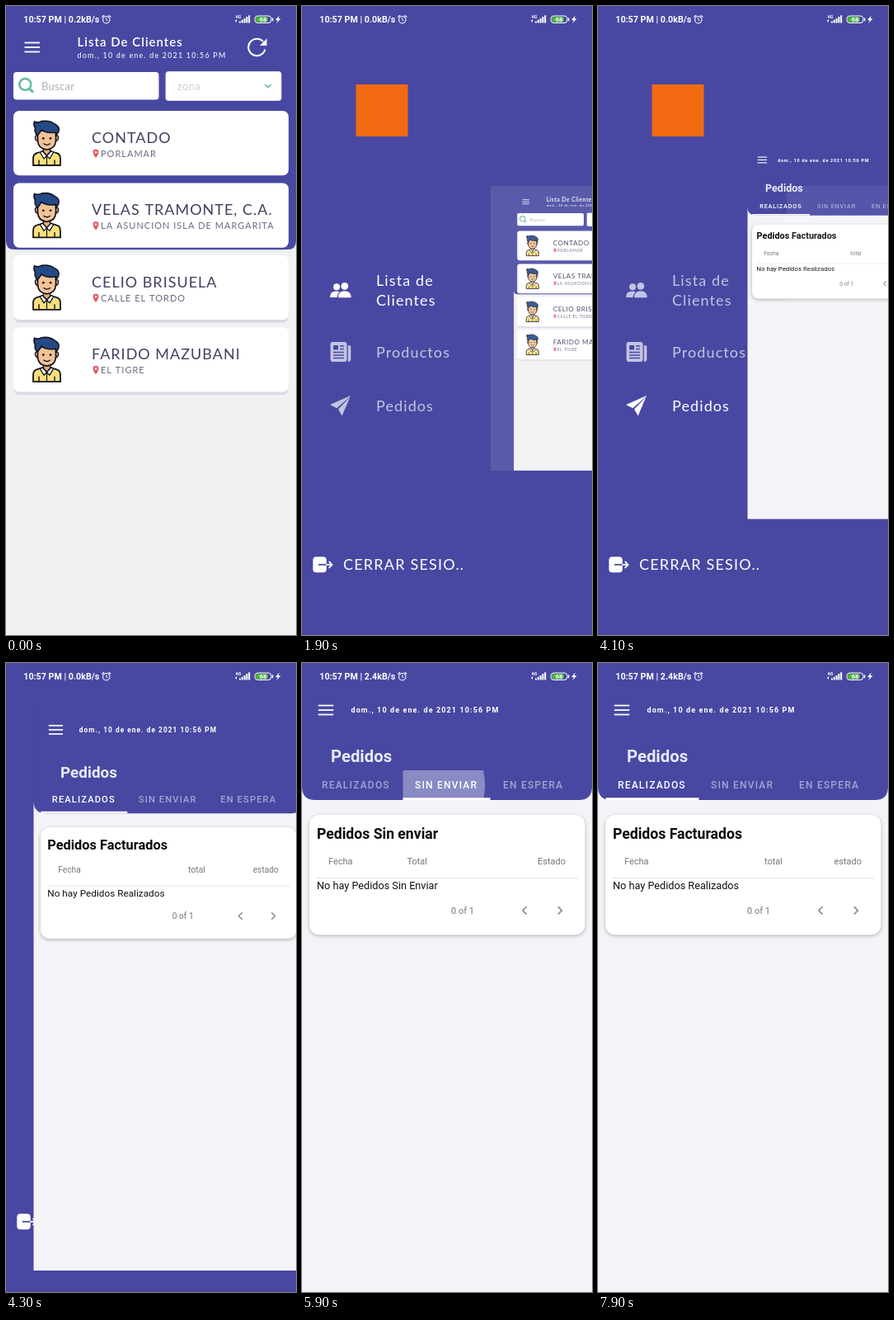
Animation of 352 by 762 pixels, one loop 8 s. Source, as an HTML page with a canvas:

```html
<!DOCTYPE html>
<html lang="es">
<head>
<meta charset="utf-8">
<title>Clientes y pedidos</title>
<style>
html, body { margin: 0; width: 100%; height: 100%; overflow: hidden; background: #4848a2; }
canvas { display: block; width: 352px; height: 762px; }
</style>
</head>
<body>
<canvas id="stage"></canvas>
<script>
const W = 352, H = 762, LOOP = 8000;
const PURPLE = '#4848a2', INK = '#433f62', GREEN = '#63b8a2';
const LATO = 'Lato, "Open Sans", sans-serif';
const ROBOTO = 'Roboto, Arial, sans-serif';
const DATE = 'dom., 10 de ene. de 2021 10:56 PM';

const canvas = document.getElementById('stage');
const ctx = canvas.getContext('2d');
const dpr = window.devicePixelRatio || 1;
canvas.width = W * dpr;
canvas.height = H * dpr;

const clamp = v => Math.max(0, Math.min(1, v));
const phase = (t, from, to) => clamp((t - from) / (to - from));
const smooth = v => v * v * (3 - 2 * v);
const white = a => `rgba(255,255,255,${a})`;

// Critically damped spring, 0 to 1
function spring(ms) {
  if (ms <= 0) return 0;
  const x = ms * 0.01207;
  return 1 - (1 + x) * Math.exp(-x);
}

function text(str, x, y, font, color, spacing = 0, align = 'left') {
  ctx.font = font;
  ctx.letterSpacing = spacing + 'px';
  ctx.textAlign = align;
  ctx.fillStyle = color;
  ctx.fillText(str, x, y);
}

function box(x, y, w, h, r, color) {
  ctx.beginPath();
  ctx.roundRect(x, y, w, h, r);
  ctx.fillStyle = color;
  ctx.fill();
}

function dot(x, y, r, color) {
  ctx.beginPath();
  ctx.arc(x, y, r, 0, 7);
  ctx.fillStyle = color;
  ctx.fill();
}

function line(points, color, width) {
  ctx.beginPath();
  points.forEach(([x, y]) => ctx.lineTo(x, y));
  ctx.strokeStyle = color;
  ctx.lineWidth = width;
  ctx.stroke();
}

function poly(points, color) {
  ctx.beginPath();
  points.forEach(([x, y]) => ctx.lineTo(x, y));
  ctx.fillStyle = color;
  ctx.fill();
}

function path(d, fill, stroke, width) {
  const p = new Path2D(d);
  if (fill) { ctx.fillStyle = fill; ctx.fill(p); }
  if (stroke) { ctx.strokeStyle = stroke; ctx.lineWidth = width; ctx.stroke(p); }
}

function at(x, y, draw) {
  ctx.save();
  ctx.translate(x, y);
  draw();
  ctx.restore();
}

function burger(x, y) {
  for (const dy of [-5.5, 0, 5.5]) line([[x, y + dy], [x + 18.5, y + dy]], '#fff', 1.8);
}

function statusBar(t) {
  const speed = t < 1800 ? '0.2' : t < 5800 ? '0.0' : '2.4';
  text(`10:57 PM | ${speed}kB/s`, 21.3, 20.2, `700 10.7px ${ROBOTO}`, '#fff');

  // alarm clock
  ctx.beginPath();
  ctx.arc(121.8, 16.7, 4.2, 0, 7);
  ctx.strokeStyle = '#fff';
  ctx.lineWidth = 1.1;
  ctx.stroke();
  line([[121.8, 14.2], [121.8, 17], [123.6, 18]], '#fff', 1);
  line([[116.4, 13.4], [119, 11.2]], '#fff', 1.3);
  line([[127.2, 13.4], [124.6, 11.2]], '#fff', 1.3);

  // signal
  text('4G', 278.5, 15, `700 5.5px ${ROBOTO}`, '#fff');
  poly([[278, 18], [280, 16], [280, 20]], '#fff');
  for (let i = 0; i < 5; i++) box(283 + i * 2.8, 18.5 - i * 1.8, 2, 2 + i * 1.8, 0.5, '#fff');

  // battery
  box(301.5, 11.5, 21, 9.5, 4.5, '#fff');
  box(302.5, 12.5, 19, 7.5, 3.7, PURPLE);
  box(303, 13, 15, 6.5, 3, '#48b43c');
  box(322.8, 14.3, 1.5, 4, 0.6, '#fff');
  text('68', 312, 19.2, `700 8px ${ROBOTO}`, '#fff', 0, 'center');
  poly([[331.8, 11.5], [327, 17], [329.8, 17], [328.4, 21], [333.4, 15.2], [330.6, 15.2]], '#fff');
}

// Portrait icon, origin at the card's top left
function avatar() {
  const k = '#14131c';
  path('M24 66 V58 Q24 52 29 51 L36 49 H45 L52 51 Q57 52 57 58 V66 Z', '#fae07a', k, 1.8);
  path('M36.5 44 V50 L40.5 54 L44.5 50 V44 Z', '#e6ac7c', k, 1.3);
  path('M35 48.5 L40.5 54.5 L37 58 L32.5 50.5 Z M46 48.5 L40.5 54.5 L44 58 L48.5 50.5 Z', '#fff', k, 1.3);
  line([[40.5, 55], [40.5, 66]], k, 1.2);
  line([[31, 59.5], [31, 66]], k, 1.4);
  line([[50, 59.5], [50, 66]], k, 1.4);
  path('M30 30 Q26 29 26.5 33 Q27 37 31 37 Z M51 30 Q55 29 54.5 33 Q54 37 50 37 Z', '#eab98a', k, 1.4);
  path('M29.5 23 H51.5 V36 Q51 46 40.5 47 Q30 46 29.5 36 Z', '#f4c395', k, 1.7);
  path('M29 30 Q25 25 26.5 21 Q24 17 25.5 13 Q31 15 34 12.6 Q44 11 50 16 Q57 19 54.5 26 L51.5 30 V26 Q40 28 34 23 Q32 27 29 30 Z',
    '#244a86', k, 1.6);
  dot(36.3, 33.4, 1.4, k);
  dot(45, 33.4, 1.4, k);
  path('M36.5 39.5 Q40.6 43.2 44.8 39.5', null, k, 1.3);
}

function pin(x, y) {
  path(`M${x} ${y + 5.5} C${x - 5.5} ${y - 1} ${x - 3.6} ${y - 5} ${x} ${y - 5} C${x + 3.6} ${y - 5} ${x + 5.5} ${y - 1} ${x} ${y + 5.5} Z`, '#df5a62');
  dot(x, y - 1.3, 1.4, '#fbe3e3');
}

const CLIENTS = [
  ['CONTADO', 'PORLAMAR'],
  ['VELAS TRAMONTE, C.A.', 'LA ASUNCION ISLA DE MARGARITA'],
  ['CELIO BRISUELA', 'CALLE EL TORDO'],
  ['FARIDO MAZUBANI', 'EL TIGRE']
];

// Purple header with rounded lower corners over a pale body
function pageBase(bottom, r, body) {
  box(0, 28, W, bottom - 28, 0, PURPLE);
  path(`M0 ${bottom - r} Q0 ${bottom} ${r} ${bottom} H${W - r} Q${W} ${bottom} ${W} ${bottom - r} V${H} H0 Z`, body);
}

function clientPage() {
  pageBase(295, 10, '#f1f1f2');
  burger(22.5, 50);
  text('Lista De Clientes', 86.5, 49.3, `600 15px ${LATO}`, '#fff', 1);
  text(DATE, 86.5, 63.2, `500 9px ${LATO}`, '#f2f2fa', 1.17);

  // refresh
  ctx.beginPath();
  ctx.arc(304.5, 50, 10.3, -0.75, 0.25, true);
  ctx.strokeStyle = '#fff';
  ctx.lineWidth = 2;
  ctx.stroke();
  poly([[316.5, 39.5], [316.5, 48], [308, 48]], '#fff');

  // search and zone fields
  box(9, 80, 176.5, 33.5, 4, '#fff');
  ctx.beginPath();
  ctx.arc(23.3, 95, 7, 0, 7);
  ctx.strokeStyle = GREEN;
  ctx.lineWidth = 2.5;
  ctx.stroke();
  line([[28.4, 100], [33, 104.6]], GREEN, 3);
  text('Buscar', 43, 101.5, `400 13px ${LATO}`, '#b0b0b5', 0.3);
  box(193.5, 79, 141, 36, 4, '#dcdcec');
  box(194.5, 80, 139, 34, 3, '#fff');
  text('zona', 208, 101.5, `400 13px ${LATO}`, '#cfcfd5', 0.3);
  line([[314.3, 95], [318, 98.6], [321.7, 95]], GREEN, 1.7);

  CLIENTS.forEach(([name, place], i) => at(9, 127 + i * 87.4, () => {
    box(0.5, 4, 333, 78, 7, 'rgba(72,72,162,0.14)');
    box(0, 0, 334, 78.3, 7, '#fff');
    avatar();
    text(name, 95, 39, `400 18px ${LATO}`, INK, 1);
    pin(100, 51.6);
    text(place, 106, 55.8, `400 11px ${LATO}`, '#6d6985', 1);
  }));
}

const TABS = [['REALIZADOS', 24], ['SIN ENVIAR', 137], ['EN ESPERA', 244]];

const ORDERS = [
  ['Pedidos Facturados', 'total', 224, 'estado', 'No hay Pedidos Realizados'],
  ['Pedidos Sin enviar', 'Total', 152, 'Estado', 'No hay Pedidos Sin Enviar']
];

function ripple(t) {
  if (t < 5500 || t > 6120) return;
  ctx.save();
  ctx.beginPath();
  ctx.roundRect(122.5, 130, 106, 35.5, 2);
  ctx.clip();
  dot(150, 148, 5 + 67 * phase(t, 5500, 5900) + 25 * phase(t, 5900, 6050),
    white(0.36 * (1 - phase(t, 5970, 6120))));
  ctx.restore();
}

function orderPage(t) {
  const pos = smooth(phase(t, 5500, 5780)) - smooth(phase(t, 7420, 7720));
  const [title, total, totalX, state, note] = ORDERS[t >= 5600 && t < 7550 ? 1 : 0];

  pageBase(166, 16, '#f4f4f8');
  burger(19.7, 57);
  text(DATE, 59.5, 60.4, `700 9px ${ROBOTO}`, '#fff', 1.1);
  text('Pedidos', 35, 120, `700 20.3px ${ROBOTO}`, '#e9e9f6');

  ripple(t);
  TABS.forEach(([label, x], i) => {
    const near = clamp(1 - Math.abs(pos - i));
    text(label, x, 152, `500 12px ${ROBOTO}`, white(0.5 + 0.5 * near), 1.2);
  });
  box(9.5 + 113 * pos, 163.3, 113 - 7 * pos, 2.8, 0, '#fff');

  ctx.save();
  ctx.shadowColor = 'rgba(0,0,0,0.28)';
  ctx.shadowBlur = 4 * dpr;
  ctx.shadowOffsetY = 1.3 * dpr;
  box(9, 184, 334.5, 145.3, 12, '#fff');
  ctx.restore();

  const small = `400 11px ${ROBOTO}`, gray = '#77777b';
  text(title, 18, 212.6, `700 17.6px ${ROBOTO}`, '#0b0b0d');
  text('Fecha', 32, 243.6, small, gray);
  text(total, totalX, 243.6, small, gray, 0, 'right');
  text(state, 320, 243.6, small, gray, 0, 'right');
  line([[18, 260.5], [335, 260.5]], '#e2e2e4', 1);
  text(note, 18, 274.3, `400 12.7px ${ROBOTO}`, '#111113');
  text('0 of 1', 181, 303.8, small, gray);
  line([[272.5, 295.2], [267.8, 299.8], [272.5, 304.4]], '#8c8c90', 1.7);
  line([[310.8, 295.2], [315.4, 299.8], [310.8, 304.4]], '#8c8c90', 1.7);
}

function peopleIcon(c) {
  dot(42, 340.2, 4, c);
  dot(51.8, 339.3, 4.4, c);
  path('M34 352.5 Q34 345.5 41.5 345.5 Q44 345.5 45.5 346.5 Q42.5 349 42.3 353 H34 Z', c);
  path('M44 353.2 Q44 345.3 51.8 345.3 Q59.6 345.3 59.6 353.2 Z', c);
}

function newsIcon(c) {
  box(34.5, 407, 20, 24, 3, c);
  path('M55.8 411 H57 Q59.3 411 59.3 413 V428 Q59 431 55.8 431 Z', c);
  box(38, 411, 6, 5.5, 1, PURPLE);
  for (const y of [412, 415.5]) line([[46, y], [51, y]], PURPLE, 1.5);
  for (const y of [419.5, 423, 426.5]) line([[38, y], [51, y]], PURPLE, 1.5);
}

function planeIcon(c) {
  poly([[59, 472], [34, 483], [42.2, 487.2], [55, 476]], c);
  poly([[59, 472], [48.6, 496.6], [44, 488.4], [56, 476]], c);
}

function exitIcon() {
  box(13.3, 667.3, 16.4, 19, 4, '#fff');
  line([[20, 676.8], [29.5, 676.8]], PURPLE, 1.8);
  line([[29.5, 676.8], [36.2, 676.8]], '#fff', 1.8);
  line([[32.6, 672.8], [36.6, 676.8], [32.6, 680.8]], '#fff', 1.8);
}

function drawer(t) {
  const font = `400 18px ${LATO}`, off = '#c3c3e3';
  const list = t < 3996 ? '#fff' : off, orders = t < 3996 ? off : '#fff';
  box(65.5, 95, 63, 63, 0, '#f26a12');
  peopleIcon(list);
  text('Lista de', 90, 339, font, list, 1.1);
  text('Clientes', 90, 363.4, font, list, 1.1);
  newsIcon(off);
  text('Productos', 90, 426, font, off, 1.1);
  planeIcon(orders);
  text('Pedidos', 90, 491, font, orders, 1.1);
  exitIcon();
  text('CERRAR SESIO..', 50, 683.4, font, '#fff', 1.2);
}

function draw(t) {
  const open = spring(t - 1574) - spring(t - 3996);
  const scale = 1 - 0.6 * open;
  ctx.setTransform(dpr, 0, 0, dpr, 0, 0);
  ctx.lineJoin = 'round';
  box(0, 0, W, H, 0, PURPLE);
  if (open > 0.0005) drawer(t);

  // the page shrinks about its own middle line while moving right
  ctx.save();
  ctx.translate(284.3 * open, 395);
  ctx.scale(scale, scale);
  ctx.translate(0, -395);
  if (t < 3996) clientPage();
  else orderPage(t);
  ctx.restore();

  // pale veil over the shrunken page
  box(229, 218, W - 229, 345, 0, white(0.11 * open));
  statusBar(t);
}

function tick() {
  draw(performance.now() % LOOP);
  requestAnimationFrame(tick);
}
tick();
</script>
</body>
</html>
```
